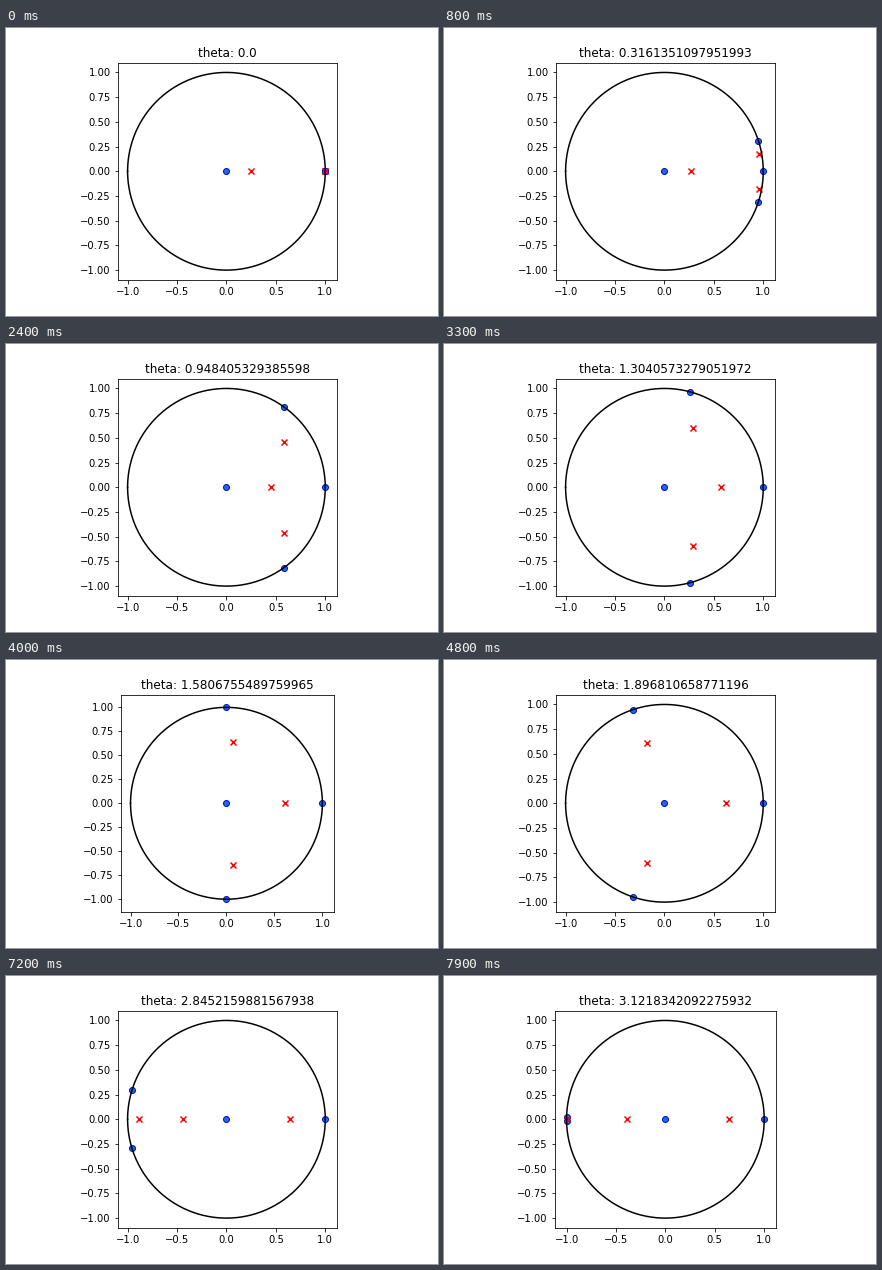
These frames come from a looping animation (432x288 px, 8 s). A matplotlib script:

```python
import numpy as np
import matplotlib.pyplot as plt
from matplotlib.animation import FuncAnimation

FRAMES, INTERVAL = 80, 100
MARGIN = 0.05
THETAS = np.linspace(0, 2 * np.pi, 160)

plt.rcParams.update({"font.family": "DejaVu Sans", "font.size": 10})
fig = plt.figure(figsize=(6, 4), dpi=72, facecolor="white")
fig.subplots_adjust(left=0.125, right=0.9, bottom=0.125, top=0.88)
ax = fig.add_subplot()
ax.set_aspect("equal", adjustable="box")

# Half a marker (3 px) in data units of the unsqueezed axes
PAD_X = 3 * 2.2 / (0.775 * 432)
PAD_Y = 3 * 2.2 / (0.755 * 288)

arc = np.linspace(0, np.pi, 500)
for side in (1, -1):
    ax.plot(np.cos(arc), side * np.sin(arc), color="black", lw=1.5)

zeros = ax.scatter([0] * 4, [0] * 4, s=36, facecolor="#2268dc",
                   edgecolor="#0010d8", linewidth=1, zorder=1)
crits = ax.scatter([0] * 3, [0] * 3, s=36, marker="x", color="red",
                   linewidth=1.5, zorder=1)
title = ax.set_title("", fontsize=12)
ax.set_xticks(np.arange(-1, 1.1, 0.5))
ax.set_yticks(np.arange(-1, 1.1, 0.25))


def as_points(z):
    return np.column_stack([z.real, z.imag])


def with_margin(low, high):
    extra = MARGIN * (high - low)
    return low - extra, high + extra


def update(i):
    theta = THETAS[i]
    z = np.array([0, 1, np.exp(1j * theta), np.exp(-1j * theta)])
    roots = np.roots(np.polyder(np.poly(z).real)).astype(complex)
    zeros.set_offsets(as_points(z))
    crits.set_offsets(as_points(roots))
    title.set_text(f"theta: {float(theta)}")

    left = min(-1, np.cos(theta) - PAD_X)
    top = max(1, np.sin(theta) + PAD_Y)
    ax.set_xlim(with_margin(left, 1 + PAD_X))
    ax.set_ylim(with_margin(-top, top))
    return zeros, crits, title


anim = FuncAnimation(fig, update, frames=FRAMES, interval=INTERVAL,
                     init_func=lambda: update(0), repeat=True,
                     repeat_delay=0, blit=False)
plt.show()
```
